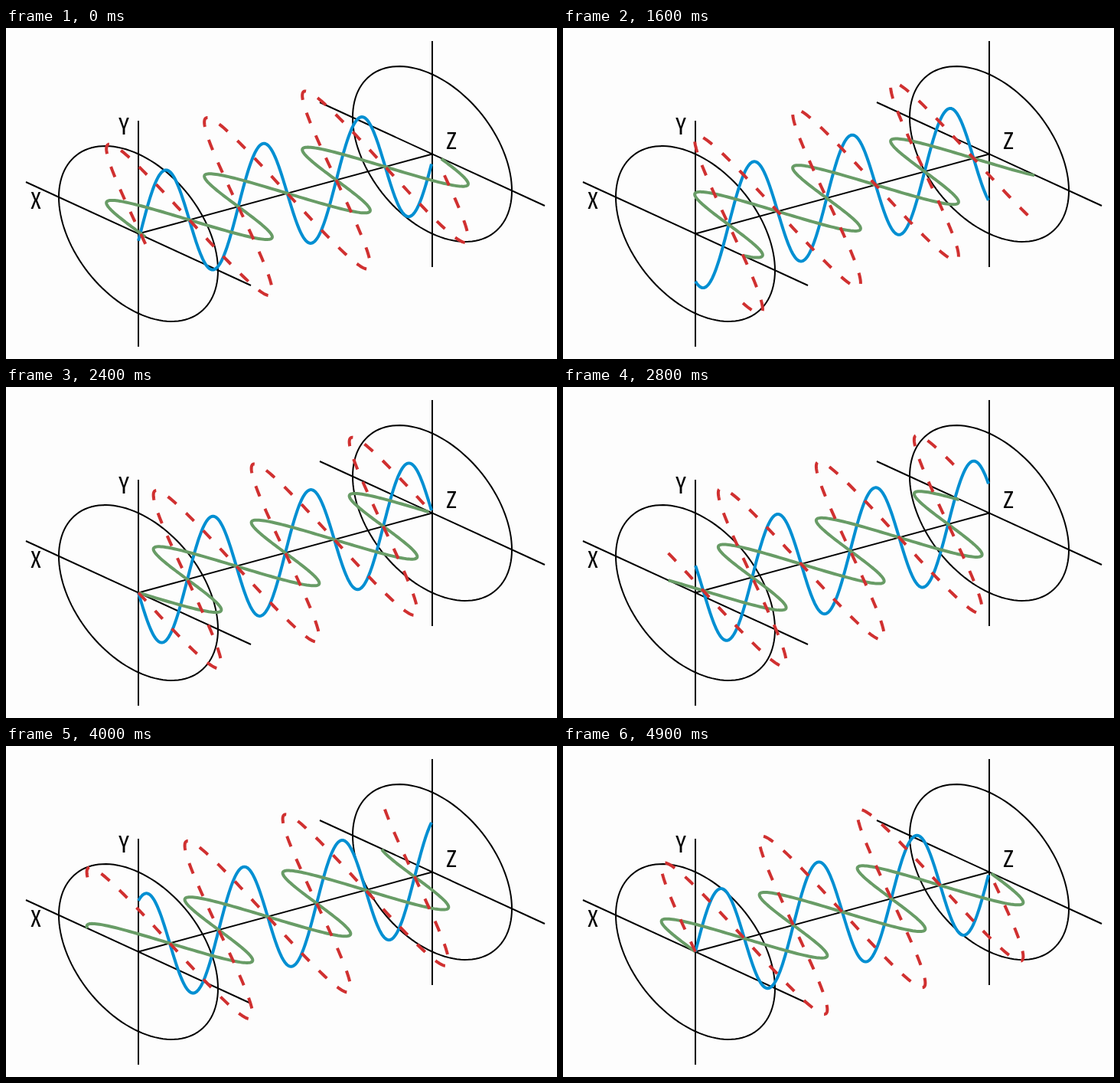
Recreate the animation shown at these times as an HTML page. Size 720 by 432 pixels, loop 5 s.

```html
<!DOCTYPE html>
<html lang="en">
<head>
<meta charset="utf-8">
<title>Linear polarisation</title>
<style>
  html, body { margin: 0; width: 100%; height: 100%; overflow: hidden; background: #fdfdfd; }
  svg { display: block; width: 720px; height: 432px; }
  .frame { fill: none; stroke: #000; stroke-width: 2; }
  .wave { fill: none; stroke-width: 4; stroke-linejoin: round; }
  text {
    font: 500 30px "Noto Sans Mono CJK JP", "Noto Sans CJK JP", "Noto Sans CJK", sans-serif;
    font-feature-settings: "hwid";
    text-anchor: middle;
  }
</style>
</head>
<body>
<svg viewBox="0 0 720 432">
  <g class="frame" id="frame"></g>
  <path class="wave" id="vertical" stroke="#008fd2"/>
  <path class="wave" id="horizontal" stroke="#689c66"/>
  <path class="wave" id="sum" stroke="#d03030" stroke-dasharray="14.5 17.53"/>
  <text x="39" y="236">X</text>
  <text x="154" y="139">Y</text>
  <text x="582" y="158">Z</text>
</svg>
<script>
const LOOP = 5000, STEPS = 50;
const START = { x: 173, y: 268.5 }, END = { x: 557, y: 164.5 };
const RADIUS = 104, AMP = RADIUS / Math.SQRT2;
const SPAN = END.x - START.x, WAVELENGTH = SPAN / 3;
const SLOPE_X = 0.459, SLOPE_Z = (END.y - START.y) / SPAN;

const byId = id => document.getElementById(id);
const toPath = points =>
  "M" + points.map(([x, y]) => x.toFixed(2) + " " + y.toFixed(2)).join("L");

// Oblique projection: u runs along X, v along Y, z along the travel axis.
const project = (u, v, z) => [
  START.x + z + u,
  START.y + SLOPE_Z * z + SLOPE_X * u - v
];

function drawFrame() {
  const circle = z => toPath(Array.from({ length: 121 }, (_, i) => {
    const a = i * Math.PI / 60;
    return project(RADIUS * Math.cos(a), RADIUS * Math.sin(a), z);
  })) + "Z";
  const line = (a, b) => toPath([project(...a), project(...b)]);
  const parts = [line([0, 0, 0], [0, 0, SPAN])];
  for (const z of [0, SPAN]) {
    parts.push(circle(z),
      line([-147, 0, z], [147, 0, z]),
      line([0, -147.5, z], [0, 147.5, z]));
  }
  byId("frame").innerHTML = parts.map(d => `<path d="${d}"/>`).join("");
}

function drawWaves(time) {
  const step = Math.floor(time % LOOP / LOOP * STEPS);
  const shift = (step + 1) / STEPS * WAVELENGTH;
  const wave = (kx, ky) => toPath(Array.from({ length: SPAN }, (_, z) => {
    const s = AMP * Math.sin(2 * Math.PI * (z - shift) / WAVELENGTH);
    return project(-kx * s, ky * s, z);
  }));
  byId("vertical").setAttribute("d", wave(0, 1));
  byId("horizontal").setAttribute("d", wave(1, 0));
  byId("sum").setAttribute("d", wave(1, 1));
}

drawFrame();
drawWaves(0);
let begin;
function tick(now) {
  begin ??= now;
  drawWaves(now - begin);
  requestAnimationFrame(tick);
}
requestAnimationFrame(tick);
</script>
</body>
</html>
```
